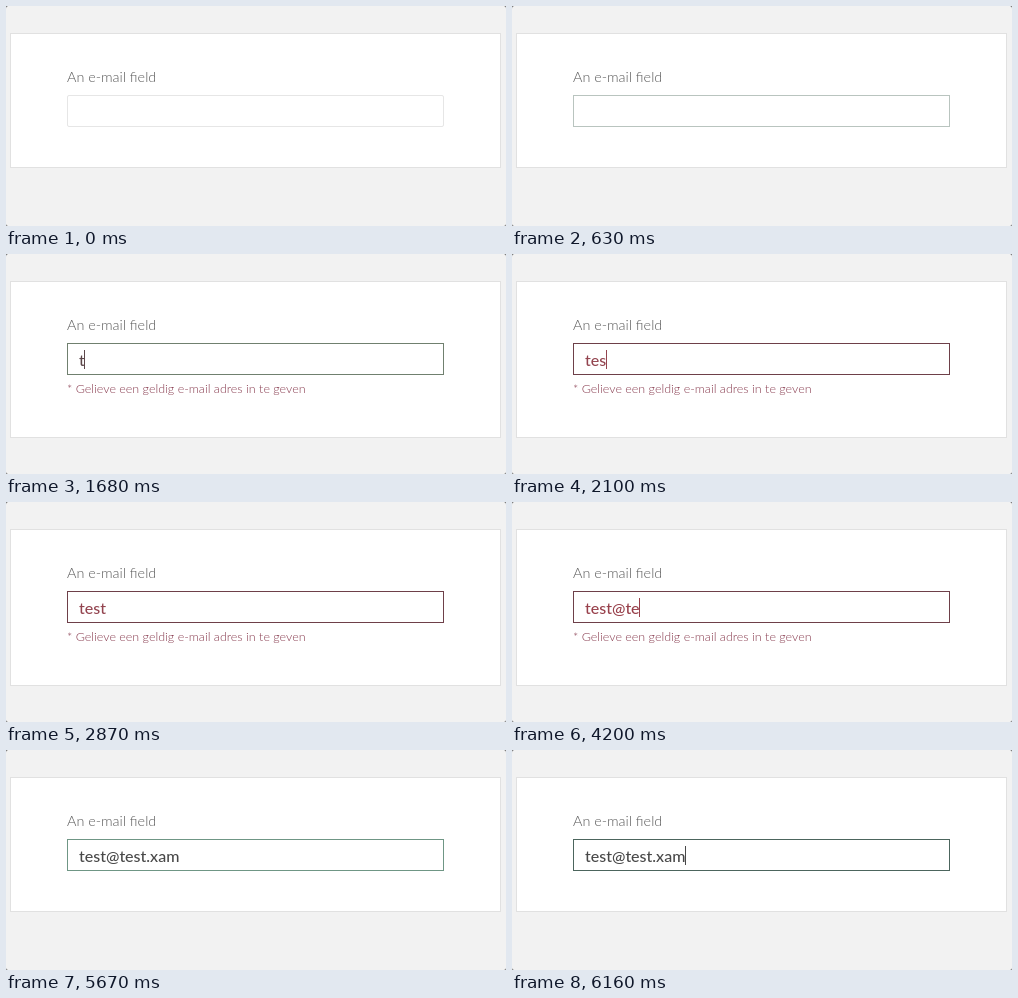
These frames come from a looping animation (500x220 px, 6580 ms). An HTML page:

```html
<!DOCTYPE html>
<html lang="en">
<head>
<meta charset="utf-8">
<title>E-mail field validation</title>
<style>
  html, body { margin: 0; width: 100%; height: 100%; overflow: hidden; background: #6a6a6a; }
  svg { display: block; width: 500px; height: 220px; font-family: Lato, "Open Sans", sans-serif; }
  .page { fill: #f2f2f2; }
  .card { fill: #fff; stroke: #e1e1e1; }
  .label { font-size: 14.4px; font-weight: 300; fill: #555; }
  .field { fill: #fff; }
  .value { font-size: 16px; font-weight: 500; }
  .error { font-size: 12.5px; font-weight: 300; fill: #86384c; }
</style>
</head>
<body>
<svg viewBox="0 0 500 220">
  <rect class="page" width="500" height="220" rx="2.5"/>
  <rect class="card" id="card" x="4.5" y="27.5" width="490" height="134"/>
  <text class="label" x="61" y="76">An e-mail field</text>
  <rect class="field" id="field" x="61.5" y="89.5" width="376" height="31"/>
  <text class="value" id="value" x="73" y="112"></text>
  <rect id="caret" x="73" y="96" width="1" height="19"/>
  <text class="error" id="error" x="61" y="139">* Gelieve een geldig e-mail adres in te geven</text>
</svg>
<script>
  const LOOP = 6580;
  const ADDRESS = "test@test.xam";
  const [card, field, value, caret, error] =
    ["card", "field", "value", "caret", "error"].map(id => document.getElementById(id));

  // Each track lists [start in ms, value]; a value holds until the next start.
  const border = [
    [0, "#e6e6e6"], [560, "#d3d8d6"], [630, "#b9c4bf"], [840, "#94b0a4"], [910, "#6f9685"],
    [1680, "#70806f"], [1750, "#705f5c"], [1820, "#6e4049"],
    [5110, "#675657"], [5180, "#6f9685"], [6090, "#5d7d71"], [6160, "#4c655d"]
  ];
  const ink = [
    [0, "#484848"], [1680, "#5c474a"], [1750, "#78464d"], [1820, "#93444f"],
    [4200, "#98404b"], [5110, "#704449"], [5180, "#484848"]
  ];
  const typed = [0, 1680, 1890, 2100, 2310, 3290, 3990, 4200, 4270, 4480, 4690, 4900, 5040, 5180]
    .map((start, count) => [start, count]);
  const blink = [
    [0, false], [840, true], [1330, false], [1680, true], [2870, false],
    [3290, true], [3780, false], [3990, true], [5670, false], [6160, true]
  ];
  const invalid = [[0, false], [1680, true], [5040, false]];

  const at = (track, t) => track.findLast(([start]) => start <= t)[1];
  const show = (el, on) => el.setAttribute("visibility", on ? "visible" : "hidden");

  function draw(t) {
    const wrong = at(invalid, t);
    const color = at(ink, t);
    const text = ADDRESS.slice(0, at(typed, t));

    card.setAttribute("height", wrong ? 156 : 134);
    show(error, wrong);
    field.setAttribute("stroke", at(border, t));
    field.setAttribute("rx", t < 560 ? 1.5 : 0);

    if (value.textContent !== text) value.textContent = text;
    value.setAttribute("fill", color);
    const width = text ? value.getComputedTextLength() : 0;
    caret.setAttribute("x", 73 + Math.floor(width));
    caret.setAttribute("fill", color);
    show(caret, at(blink, t));
  }

  const begin = performance.now();
  function tick() {
    draw((performance.now() - begin) % LOOP);
    requestAnimationFrame(tick);
  }
  tick();
</script>
</body>
</html>
```
